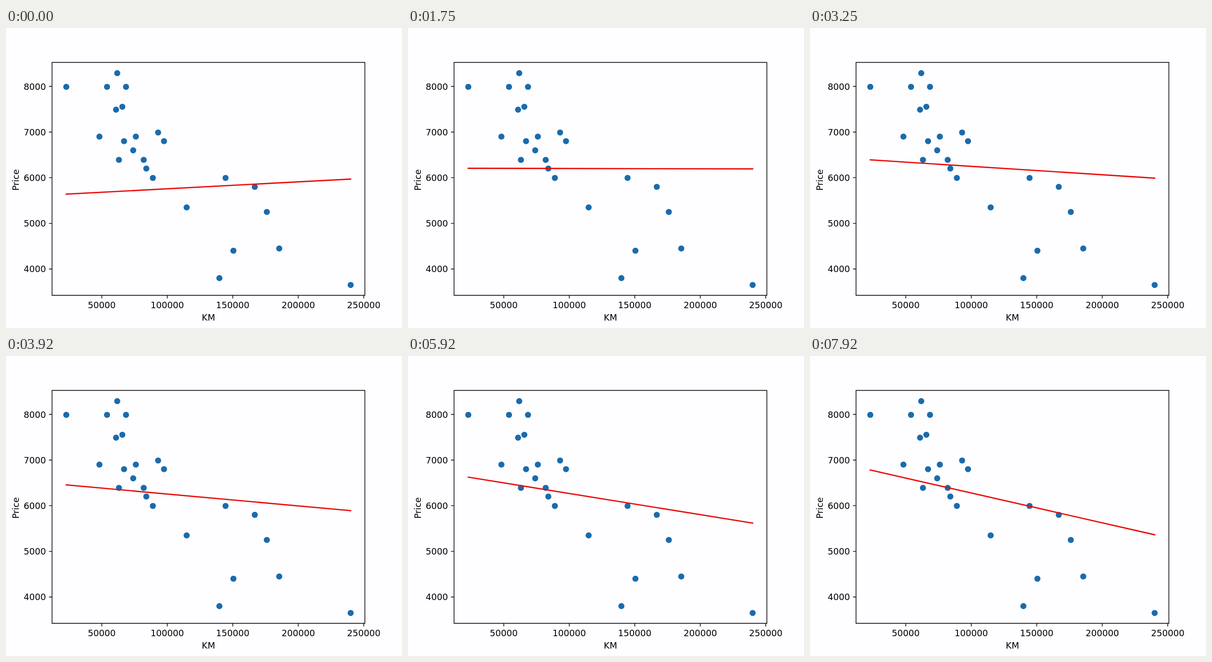
Animation, 800 px wide and 606 px high, one loop 8000 ms. Source, as an HTML page:

```html
<!DOCTYPE html>
<html lang="en">
<head>
<meta charset="utf-8">
<title>Price by distance</title>
<style>
  html, body { margin: 0; width: 100%; height: 100%; overflow: hidden; background: #fefdff; }
  svg { display: block; width: 800px; height: 606px; }
  text { font: 17.7px "DejaVu Sans", sans-serif; fill: #000; text-anchor: middle; }
  .right { text-anchor: end; }
  .axes { fill: none; stroke: #000; stroke-width: 1.4; }
  .dots { fill: #1a6bac; }
  #fit { fill: none; stroke: #ea0c0a; stroke-width: 2.65; stroke-linecap: square; }
</style>
</head>
<body>
<svg id="chart" viewBox="0 0 800 606">
  <g class="dots"></g>
  <path id="fit"/>
  <path class="axes"/>
  <text x="409" y="591.2">KM</text>
  <text transform="translate(25.5 307) rotate(-90)">Price</text>
</svg>
<script>
const DURATION = 8000;
const STEPS = 96;
const LEARNING_RATE = 0.1;
const chart = document.getElementById('chart');

// Observations: each price with the distances, in thousands of km, sold at it.
const cars = [
  [8290, 61.8], [7990, 22.9, 54, 68.5], [7555, 65.7], [7490, 60.9],
  [6990, 93], [6900, 48.2, 76], [6800, 67, 97.5], [6600, 74],
  [6390, 63.1, 82], [6200, 84], [5995, 89, 144.5], [5800, 166.8],
  [5350, 114.8], [5250, 176], [4450, 185.5], [4400, 150.5],
  [3800, 139.8], [3650, 240]
].flatMap(([price, ...kms]) => kms.map(km => ({ km, price })));

const toX = km => 193.5 + (km - 50) * 2.646;
const toY = price => 118 + (8000 - price) * 0.0922;

function add(parent, tag, attrs, text = '') {
  const node = document.createElementNS('http://www.w3.org/2000/svg', tag);
  for (const key in attrs) node.setAttribute(key, attrs[key]);
  node.textContent = text;
  parent.append(node);
}

for (const { km, price } of cars) {
  add(chart.querySelector('.dots'), 'circle', { cx: toX(km), cy: toY(price), r: 6.15 });
}

let axes = 'M93 69.5H725V540H93Z';
for (let i = 0; i < 5; i++) {
  const km = 50 * (i + 1);
  const price = 8000 - 1000 * i;
  axes += `M${toX(km)} 540v6.2M93 ${toY(price)}h-6.2`;
  add(chart, 'text', { x: toX(km), y: 566 }, km * 1000);
  add(chart, 'text', { x: 80.8, y: toY(price) + 6.5, class: 'right' }, price);
}
chart.querySelector('.axes').setAttribute('d', axes);

function range(key) {
  const values = cars.map(car => car[key]);
  const min = Math.min(...values);
  return { min, span: Math.max(...values) - min };
}

const kmRange = range('km');
const priceRange = range('price');
const samples = cars.map(({ km, price }) => ({
  u: (km - kmRange.min) / kmRange.span,
  v: (price - priceRange.min) / priceRange.span
}));
const mean = f => samples.reduce((sum, s) => sum + f(s), 0) / samples.length;

// Gradient descent on the normalised data, drawn as a line after each round.
function fitLine(rounds) {
  let base = 0, slope = 0;
  while (rounds-- > 0) {
    const error = ({ u, v }) => base + slope * u - v;
    const baseStep = mean(error);
    const slopeStep = mean(s => error(s) * s.u);
    base -= LEARNING_RATE * baseStep;
    slope -= LEARNING_RATE * slopeStep;
  }
  const end = u => `${toX(kmRange.min + u * kmRange.span)} ` +
    toY(priceRange.min + (base + slope * u) * priceRange.span);
  return `path("M${end(0)}L${end(1)}")`;
}

// Training runs slightly slower than the display, so a pose sometimes repeats.
const roundsAt = step => 14 + Math.floor(step * 50 / 51 + 0.11);

const frames = Array.from({ length: STEPS + 1 }, (_, step) => ({
  offset: Math.round(step * DURATION / STEPS / 10) * 10 / DURATION,
  d: fitLine(roundsAt(Math.min(step, STEPS - 1))),
  easing: 'steps(1, end)'
}));
document.getElementById('fit').animate(frames, { duration: DURATION, iterations: Infinity });
</script>
</body>
</html>
```
